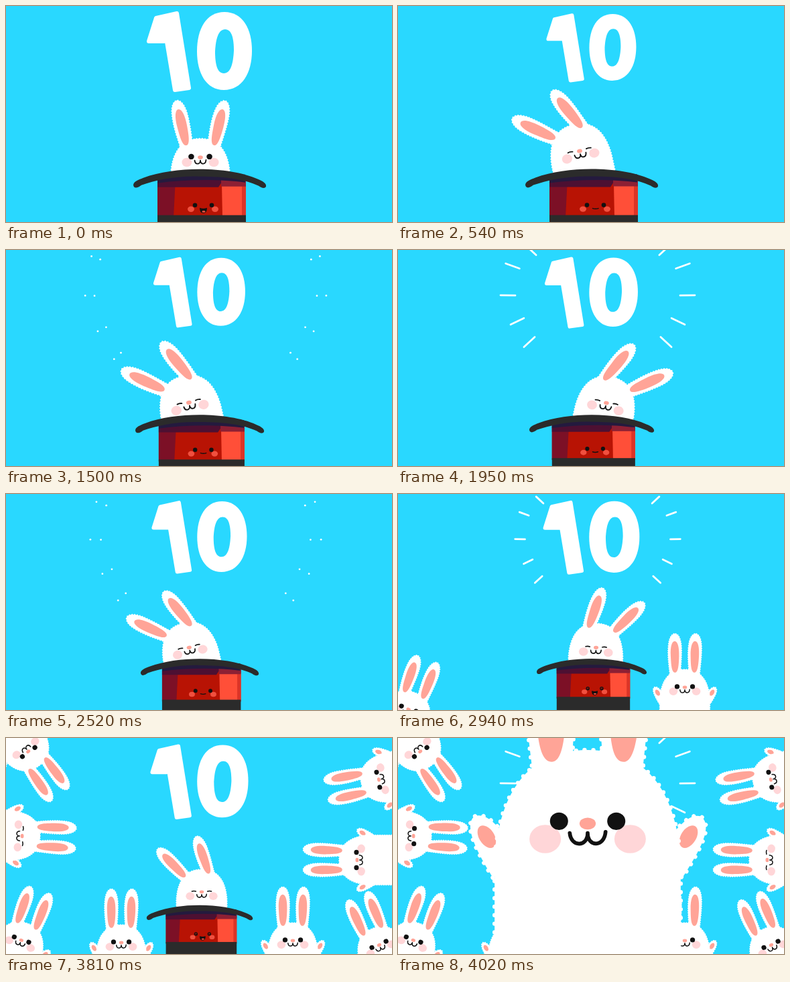
An HTML page with a canvas for the animation above (4.05 s loop, 576x324 px).

```html
<!DOCTYPE html>
<html lang="en">
<head>
<meta charset="utf-8">
<title>Ten rabbits</title>
<style>
html, body { margin: 0; width: 100%; height: 100%; overflow: hidden; background: #29d8ff; }
canvas { display: block; width: 576px; height: 324px; }
</style>
</head>
<body>
<canvas id="stage" width="576" height="324"></canvas>
<script>
const ctx = document.getElementById('stage').getContext('2d');
const LOOP = 4050, STEP = 30, BEAT = 517.5, BEAT_AT = 1950, SWAY_AT = 1050;
const SKY = '#29d8ff', WHITE = '#fff', PINK = '#ffa497', BLUSH = '#ffd6d8', INK = '#111', DARK = '#2b2b2b';
const RAD = Math.PI / 180;

const clamp = (v, a, b) => Math.max(a, Math.min(b, v));
const mix = (a, b, u) => a + (b - a) * u;
const ease = (t, a, b) => {
  const u = clamp((t - a) / (b - a), 0, 1);
  return u * u * (3 - 2 * u);
};

// piecewise value through [time, value] pairs
function track(t, keys) {
  for (let i = 1; i < keys.length; i++) {
    if (t <= keys[i][0]) {
      const [a, v] = keys[i - 1], [b, w] = keys[i];
      return mix(v, w, (t - a) / (b - a));
    }
  }
  return keys[keys.length - 1][1];
}

// time from the nearest beat, from -BEAT/2 to BEAT/2
const nearBeat = t => {
  const b = (((t - BEAT_AT) % BEAT) + BEAT) % BEAT;
  return b > BEAT / 2 + 80 ? b - BEAT : b;
};

function hop(t) {
  const u = (nearBeat(t) - 60) / 260;
  return u > 0 && u < 1 ? Math.sin(Math.PI * Math.pow(u, 1.7)) : 0;
}

function at(x, y, deg, scale, draw) {
  ctx.save();
  ctx.translate(x, y);
  ctx.rotate(deg * RAD);
  ctx.scale(scale, scale);
  draw();
  ctx.restore();
}

function oval(x, y, rx, ry, color, deg = 0) {
  ctx.beginPath();
  ctx.ellipse(x, y, rx, ry, deg * RAD, 0, Math.PI * 2);
  ctx.fillStyle = color;
  ctx.fill();
}

function line(path, width, color = INK) {
  ctx.lineWidth = width;
  ctx.lineCap = 'round';
  ctx.lineJoin = 'round';
  ctx.strokeStyle = color;
  ctx.stroke(new Path2D(path));
}

function shape(path, color) {
  ctx.fillStyle = color;
  ctx.fill(new Path2D(path));
}

// white shape with a slightly furry edge
function fur(path) {
  shape(path, WHITE);
  ctx.setLineDash([0, 3.6]);
  line(path, 1.8, WHITE);
  ctx.setLineDash([]);
}

const EAR = 'M-8 4 C-10 -14 -12 -34 -9 -49 C-7 -58 -3 -62 1 -62 C7 -61 10 -52 10.5 -42 C11 -26 9 -10 8 4 Z';
const INNER = 'M0 -1 C-6 -1 -6 -16 -6.5 -27 C-7 -42 -4 -50 0 -50 C5 -50 7 -40 6.5 -27 C6 -14 5 -1 0 -1 Z';
const BODY = 'M-39 120 L-39 48 C-38 24 -29 0 0 0 C29 0 38 24 39 48 L39 120 Z';
const SHORT_BODY = 'M-39 84 L-39 48 C-38 24 -29 0 0 0 C29 0 38 24 39 48 L39 84 Z';

function ear(x, y, deg) {
  at(x, y, deg, 1, () => {
    fur(EAR);
    shape(INNER, PINK);
  });
}

function arm(side) {
  at(side * 37, 45, side * 32, 1, () => {
    fur('M-7 6 C-7 -6 -6 -19 0 -20 C7 -19 7 -6 7 6 Z');
    oval(0, -10, 3.2, 5.2, PINK);
  });
}

function face(y, closed) {
  for (const s of [-1, 1]) {
    oval(s * 17.8, y + 7.5, 6.6, 6, BLUSH);
    if (closed) line(`M${s * 12 - 3} ${y} q3 -1 6 0`, 1.6);
    else oval(s * 12, y, 3.8, 3.7, INK);
  }
  oval(0, y + 1, 3.4, 2.5, PINK);
  line(`M-7.5 ${y + 5} C-7 ${y + 11} 0 ${y + 11} 0 ${y + 5} C0 ${y + 11} 7 ${y + 11} 7.5 ${y + 4.5}`, 1.6);
}

function rabbit(x, y, deg, scale, faceY, closed) {
  at(x, y, deg, scale, () => {
    arm(-1);
    arm(1);
    fur(BODY);
    ear(-15, 6, -1);
    ear(15, 6, 1);
    face(faceY, closed);
  });
}

function digits(t) {
  const s = track(t, [[0, 1], [120, 0.92], [270, 0.85], [1050, 0.86], [1950, 0.885], [2520, 0.905], [3240, 0.924], [4050, 0.933]]);
  at(288, 30, 0, s, () => {
    ctx.translate(-288, -30);
    const one = 'M224 18 L255 11 L273 123 L252 126 L239 48 L236 53 L213 53 Z';
    shape(one, WHITE);
    line(one, 6, WHITE);
    shape('M326 9 C353 9 367 34 367 67 C367 101 352 126 325 126 C299 126 285 101 285 68 C285 34 299 9 326 9 Z', WHITE);
    shape('M327 35 C337 35 340 49 340 67 C339 87 335 101 325 101 C315 101 312 87 312 68 C313 49 317 35 327 35 Z', SKY);
  });
}

// right-hand rays: x, y from the centre, slope in degrees
const RAYS = [[100, -66, -43], [127, -42, -20], [134, 2, -1], [120, 41, 26], [102, 72, 43]];

function sparks(t) {
  const b = nearBeat(t);
  if (b < -100 || b > 75) return;
  const k = 1 + b * (b > 0 ? 0.0043 : 0.003);
  const half = b < 0 ? mix(3, 11, (b + 100) / 100) : 11 - b * 0.06;
  for (const [x, y, slope] of RAYS) {
    for (const s of [-1, 1]) {
      const dx = half * Math.cos(slope * RAD) * s, dy = half * Math.sin(slope * RAD);
      const cx = 298 + s * x * k, cy = 66 + y * k;
      if (b > 25) {
        oval(cx - dx, cy - dy, 1.4, 1.4, WHITE);
        oval(cx + dx, cy + dy, 1.4, 1.4, WHITE);
      } else {
        line(`M${cx - dx} ${cy - dy} L${cx + dx} ${cy + dy}`, 2.8, WHITE);
      }
    }
  }
}

function hat(t, y, scale) {
  at(289, y, 0, scale, () => {
    const box = (x, top, w, h, c) => { ctx.fillStyle = c; ctx.fillRect(x, top, w, h); };
    box(-63, 14, 132, 58, '#b81304');
    shape('M-63 14 H-36 L-39 72 H-63 Z', '#7c1026');
    shape('M33 22 H69 V72 H34 Z', '#ff4f38');
    box(63, 16, 6, 56, '#dc3427');
    shape('M-63 14 H69 V24 L32 21 L28 27 L-63 27 Z', '#4d1032');
    shape('M32 14 H69 V26 L32 26 Z', '#8d2034');
    box(-63, 69, 132, 60, DARK);
    shape('M-62 8 L68 8 L68 20 C30 15 -20 15 -63 21 Z', '#241a3e');
    shape('M-99 24 C-99 19 -92 16 -84 13 C-60 4 -30 0 0 0 C32 0 65 5 87 15 C95 18 100 22 99 26 C97 30 92 28 88 25 C66 15 40 11 0 11 C-38 10 -66 17 -87 24 C-92 28 -98 30 -99 24 Z', DARK);

    const happy = t < 300 || t >= 2760;
    for (const s of [-1, 1]) {
      oval(5 + s * 18, 60, 5, 4.2, '#f0503f');
      oval(5.5 + s * 12.5, 54, 3.3, 3.3, INK);
      if (t >= 2760) {
        oval(5.5 + s * 12.5, 54, 1.8, 1.8, '#8e1a12');
        oval(6 + s * 12.5, 55, 1, 1, INK);
      }
    }
    if (happy) {
      shape('M0 58 Q5.5 60 11 58 Q11 66 5.5 66 Q0 66 0 58 Z', INK);
      oval(6, 63.7, 2.6, 1.4, '#f0503f');
    } else {
      line('M1.5 59 Q5.5 60.5 10 59', 1.5);
    }
  });
}

function performer(t) {
  const on = ease(t, 30, 400);
  const sway = on * clamp(1.6 * Math.cos((t - SWAY_AT) / BEAT * Math.PI), -1, 1);
  const tilt = 12.5 * sway * (1 - ease(t, 2620, 3100));
  const size = track(t, [[0, 1.13], [1050, 1.2], [1950, 1.14], [2520, 1.08], [3240, 1.01], [3810, 0.97]]);
  const wide = track(t, [[0, 1], [1050, 1], [1950, 0.94], [2520, 0.89], [3240, 0.785], [3810, 0.8]]);
  const h = hop(t);
  const brim = track(t, [[0, 246], [1050, 247.5], [3240, 247], [3810, 252]]) - 5 * h;
  const rise = mix(36, 51, on) + 18 * h;

  at(mix(290, 292, on) + 1.2 * tilt, brim, tilt, size, () => {
    ctx.translate(0, -rise);
    fur(SHORT_BODY);
    for (const s of [-1, 1]) {
      ear(s * 18 + 8 * sway, 10 + 3 * s * sway, s * 13 + 40 * sway);
    }
    face(mix(24, 34, on), t >= 240);
  });
  hat(t, brim, wide);
}

// head-top position, angle, start, overshoot, blink start and end
const CROWD = [
  [428, 277, 0, 2780, 14, 3400, 3500],
  [32, 278, 20, 2840, 12, 3180, 3300],
  [546, 286, -24, 2960, 20, 3500, 3600],
  [172, 280, 0, 3080, 38, 3400, 3520],
  [49, 42, 144, 3090, 27, 3500, 3600],
  [530, 68, -102, 3420, 25, 3600, 3700],
  [50, 148, 92, 3500, 24, 3750, 3900],
  [524, 183, -90, 3660, 27, 3960, 4050]
];

function crowd(t) {
  for (const [x, y, deg, start, over, shut, open] of CROWD) {
    if (t < start) continue;
    const out = mix(-115, over, ease(t, start, start + 150)) - over * ease(t, start + 165, start + 330);
    const dx = Math.sin(deg * RAD) * out, dy = -Math.cos(deg * RAD) * out;
    rabbit(x + dx, y + dy, deg, 0.96, 27, t >= shut && t < open);
  }
}

function giant(t) {
  if (t < 3840) return;
  const u = ease(t, 3825, 4005);
  rabbit(283, mix(390, 18, u), 0, 3.56, 30, false);
}

function draw(t) {
  ctx.fillStyle = SKY;
  ctx.fillRect(0, 0, 576, 324);
  sparks(t);
  digits(t);
  crowd(t);
  performer(t);
  giant(t);
}

const begin = performance.now();
function tick() {
  const t = (performance.now() - begin) % LOOP;
  draw(Math.floor(t / STEP) * STEP);
  requestAnimationFrame(tick);
}
tick();
</script>
</body>
</html>
```
